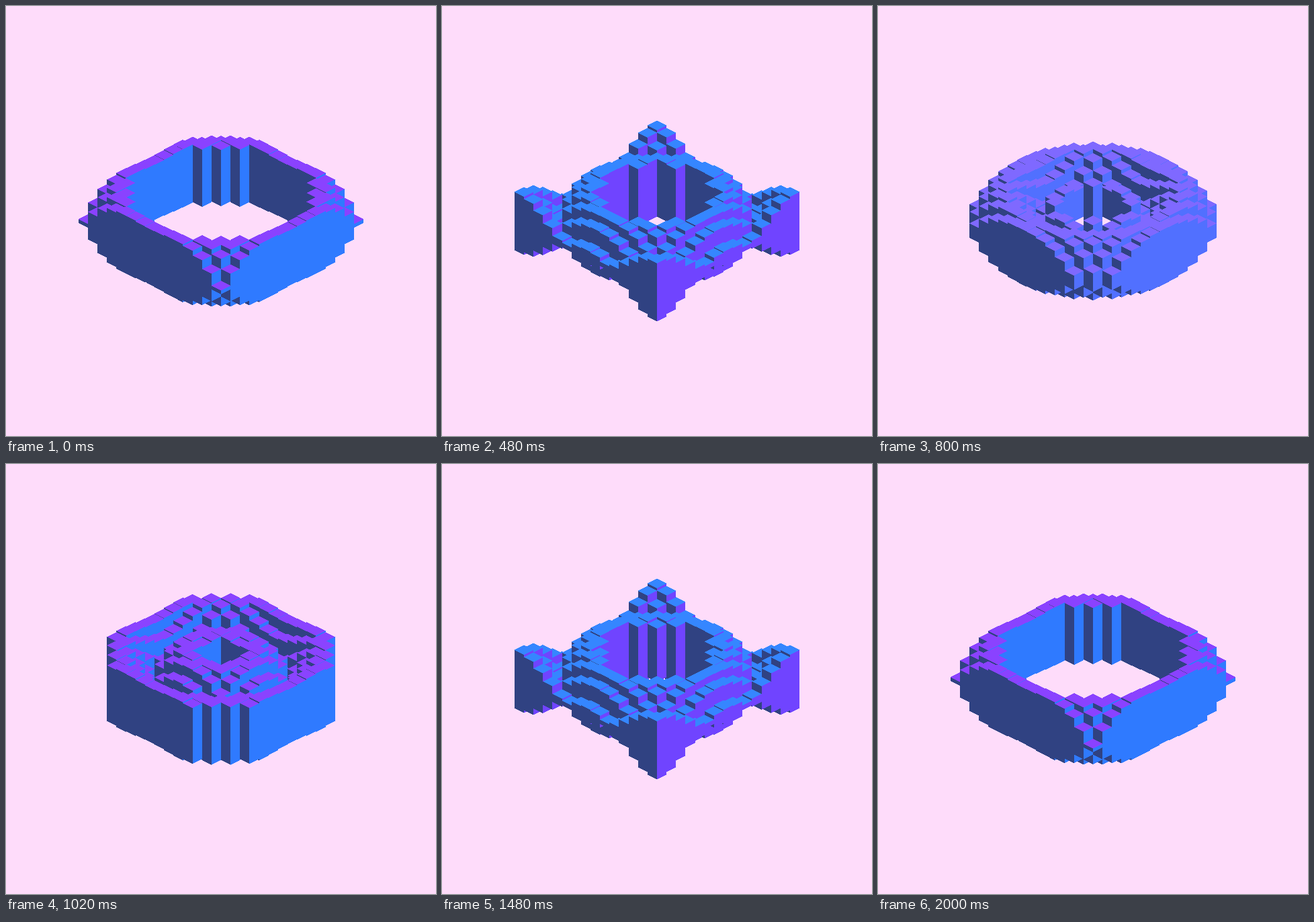
An HTML page for the animation above (2.02 s loop, 640 by 640 pixels).

```html
<!DOCTYPE html>
<html lang="en">
<head>
<meta charset="utf-8">
<title>Box wave</title>
<style>
  html, body { margin: 0; width: 100%; height: 100%; overflow: hidden; background: #fedcfa; }
  svg { display: block; width: 100vw; height: 100vh; }
</style>
</head>
<body>
<svg id="stage" viewBox="0 0 640 640" shape-rendering="crispEdges"></svg>
<script>
const SVG_NS = 'http://www.w3.org/2000/svg';
const FRAME_MS = 20, FRAMES = 101;
const REACH = 7;                      // cells run from -REACH to REACH
const HALF_W = 20 * Math.SQRT1_2;     // half a tile, across
const HALF_H = HALF_W / 2;            // half a tile, down
const MAX_LIFT = 50 * Math.cos(Math.PI / 6);
const BAND = 3.19;                    // half width of the visible ring
const WAVELENGTH = 10;

const stage = document.getElementById('stage');

function addPath(parent) {
  return parent.appendChild(document.createElementNS(SVG_NS, 'path'));
}

function makeCell(i, j) {
  const group = stage.appendChild(document.createElementNS(SVG_NS, 'g'));
  return {
    group,
    x: 320 + (i - j) * HALF_W,
    y: 320 + (i + j) * HALF_H,
    distance: Math.hypot(i, j),
    left: addPath(group), right: addPath(group), top: addPath(group)
  };
}

// Back to front
const cells = [];
for (let sum = -2 * REACH; sum <= 2 * REACH; sum++) {
  for (let i = -REACH; i <= REACH; i++) {
    if (Math.abs(sum - i) <= REACH) cells.push(makeCell(i, sum - i));
  }
}

function setFace(path, fill, points) {
  path.setAttribute('d', 'M' + points.map(p => p.map(v => v.toFixed(2))).join('L') + 'Z');
  path.setAttribute('fill', fill);
}

// Blend from a (mix 1) to b (mix -1), brightened in between
function blend(a, b, glow, mix) {
  const channel = k => Math.round((a[k] + b[k]) / 2 + (a[k] - b[k]) / 2 * mix + glow[k] * (1 - mix * mix));
  return `rgb(${channel(0)},${channel(1)},255)`;
}

function draw(t) {
  const mix = Math.cos(4 * Math.PI * t);
  const topFill = blend([138, 66], [52, 134], [21, 17], mix);
  const rightFill = blend([47, 122], [112, 68], [13, 10], mix);
  const ring = 5 + 5 * Math.abs(1 - 2 * t);

  for (const { group, x, y, distance, left, right, top } of cells) {
    const visible = Math.abs(distance - ring) < BAND;
    group.setAttribute('display', visible ? 'inline' : 'none');
    if (!visible) continue;

    const lift = MAX_LIFT * Math.abs(Math.sin(2 * Math.PI * (t - distance / WAVELENGTH)));
    const west = s => [x - HALF_W, y + s * lift];
    const east = s => [x + HALF_W, y + s * lift];
    const south = s => [x, y + HALF_H + s * lift];
    const north = [x, y - HALF_H - lift];

    setFace(left, '#304282', [west(-1), south(-1), south(1), west(1)]);
    setFace(right, rightFill, [south(-1), east(-1), east(1), south(1)]);
    setFace(top, topFill, [north, east(-1), south(-1), west(-1)]);
  }
}

function tick(now) {
  draw(Math.floor(now / FRAME_MS) % FRAMES / (FRAMES - 1));
  requestAnimationFrame(tick);
}

draw(0);
requestAnimationFrame(tick);
</script>
</body>
</html>
```
